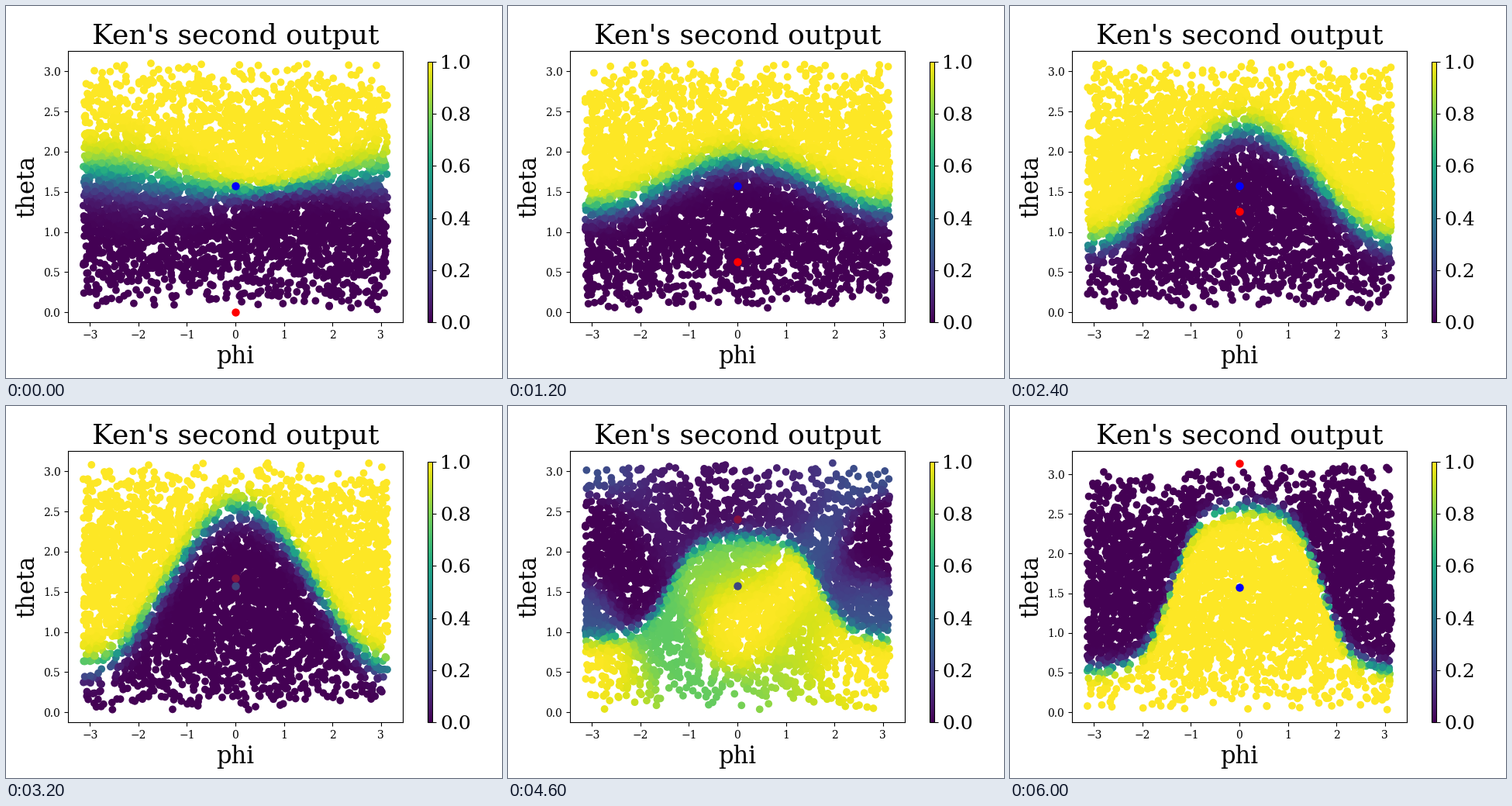
Recreate the animation shown at these times as a matplotlib script. Size 640 px wide and 480 px high, loop 6.2 s.

```python
import numpy as np
import matplotlib.pyplot as plt
from matplotlib.animation import FuncAnimation

FRAMES, INTERVAL = 31, 200
POINTS = 4000
LOW, HIGH = .03, 3.105     # sampled range of theta
SWAP, SWAP_SPAN = 20, 4    # step where the classes trade places, steps of blending

# Blobs of the unsettled state: phi, theta, two radii, tilt, strength.
BLOBS = [
    (-1.95, 1.40, 1.60, .50, -.75, -6.0),
    (2.95, 2.15, .85, .45, 0, -5.2),
    (-.50, 2.60, 1.50, 1.00, 0, -1.9),
    (-.30, .20, 1.00, .40, 0, -1.8),
    (0, 1.10, .85, .50, .30, 4.2),
    (1.50, 1.90, 1.30, .38, .65, 3.6),
    (2.95, .75, 1.15, .78, 0, 4.8),
    (3.00, 2.95, 1.00, .33, 0, 4.0),
]

plt.rcParams["font.family"] = "DejaVu Serif"


def sigmoid(z):
    return 1 / (1 + np.exp(-np.clip(z, -50, 50)))


def sample(i):
    rng = np.random.default_rng(100 + i)
    phi = rng.uniform(-np.pi, np.pi, POINTS)
    theta = np.arccos(rng.uniform(np.cos(HIGH), np.cos(LOW), POINTS))
    return phi, theta


def rising(i, phi, theta):
    """High theta is class one; the cosine boundary grows with each step."""
    edge = 1.6 - .004 * i + (.0685 * i - .11) * np.cos(phi - .1)
    start = max(0, 1 - i / 6)
    soft = .08 + start * (.015 - .045 * np.cos(phi - .8))
    return sigmoid((theta - edge) / soft)


def swapped(i, phi, theta):
    """Low theta is class one, under a plateau with steep flanks."""
    plateau = np.tanh(1.7 * np.cos(phi - .15)) / np.tanh(1.7)
    edge = 1.57 + (.055 * i - .63) * plateau
    return sigmoid((edge - theta) / .045)


def unsettled(phi, theta):
    z = np.zeros_like(phi)
    for x, y, rx, ry, tilt, strength in BLOBS:
        dx = (phi - x + np.pi) % (2 * np.pi) - np.pi
        dy = theta - y
        u = dx * np.cos(tilt) + dy * np.sin(tilt)
        w = dy * np.cos(tilt) - dx * np.sin(tilt)
        z += strength * np.exp(-(u / rx) ** 2 - (w / ry) ** 2)
    return sigmoid(z)


def field(i, phi, theta):
    settled = rising if i <= SWAP else swapped
    mix = max(0, 1 - abs(i - SWAP) / SWAP_SPAN)
    return (1 - mix) * settled(i, phi, theta) + mix * unsettled(phi, theta)


fig = plt.figure(figsize=(6.4, 4.8), dpi=100)
fig.subplots_adjust(left=.125, right=.8, bottom=.15, top=.88)
ax = fig.add_subplot()
ax.set_title("Ken's second output", fontsize=26)
ax.set_xlabel("phi", fontsize=22)
ax.set_ylabel("theta", fontsize=22)
ax.set_xlim(-1.1 * np.pi, 1.1 * np.pi)

cloud = ax.scatter(np.zeros(POINTS), np.zeros(POINTS), c=np.zeros(POINTS),
                   cmap="viridis", vmin=0, vmax=1)
blue_dot, red_dot = (ax.scatter([0], [np.pi / 2], s=42, c=color, antialiased=False)
                     for color in ("blue", "red"))

bar = fig.colorbar(cloud, cax=fig.add_axes([.85, .15, .01, .7]))
bar.ax.tick_params(labelsize=18)


def update(i):
    phi, theta = sample(i)
    cloud.set_offsets(np.column_stack([phi, theta]))
    cloud.set_array(field(i, phi, theta))

    red = np.pi * i / (FRAMES - 1)
    red_dot.set_offsets([[0, red]])
    muted = abs(i - SWAP) <= SWAP_SPAN
    blue_dot.set_color("#3d4580" if muted else "blue")
    red_dot.set_color("#85123f" if muted else "red")

    top = max(HIGH, red)
    pad = .05 * (top - LOW)
    ax.set_ylim(LOW - pad, top + pad)
    return cloud, blue_dot, red_dot


anim = FuncAnimation(fig, update, frames=FRAMES, interval=INTERVAL,
                     repeat=True, repeat_delay=0, blit=False)
plt.show()
```
